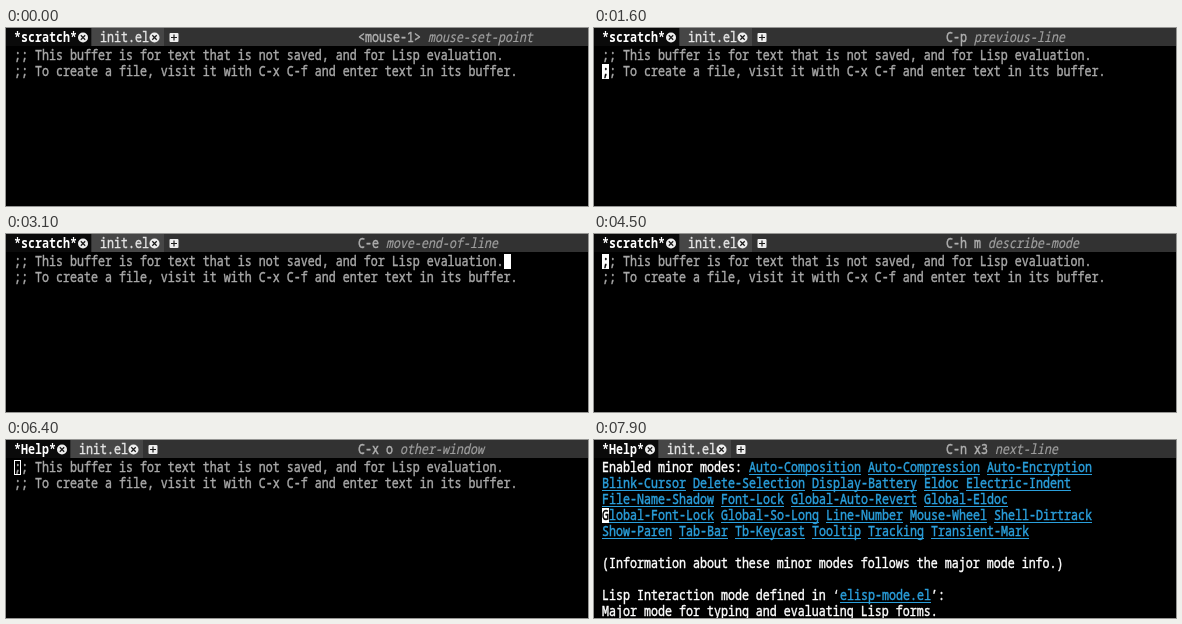
These frames come from a looping animation (582 by 178 pixels, 8 s). An HTML page:

```html
<!DOCTYPE html>
<html lang="en">
<head>
<meta charset="utf-8">
<title>Keycast in the tab bar</title>
<style>
  html, body { margin: 0; width: 100%; height: 100%; overflow: hidden; background: #000; }
  svg { display: block; width: 582px; height: 178px; }
  text { font: 500 14px "Noto Sans Mono", "DejaVu Sans Mono", monospace; white-space: pre; stroke-width: .45px; }
  .bold { font-weight: 700; stroke-width: 0; }
  .italic { font-style: italic; font-weight: 400; stroke-width: .2px; }
</style>
</head>
<body>
<svg id="stage" viewBox="0 0 582 178"></svg>
<script>
const LOOP = 8000, LEFT = 8, CHAR = 7, LINE = 16, TOP = 20;
const NARROW = 5 / 6; // condensed face: 8.4px advance becomes 7px
const C = {
  bar: '#323232', tab: '#464646', active: '#0a0a0a', bright: '#ffffff', inactive: '#e4e4e4', icon: '#eeeeee',
  mark: '#1c1c1c', key: '#b0b0b0', command: '#a0a0a0', comment: '#a8a8a8', help: '#ffffff',
  link: '#2a9fdc', cursor: '#ffffff'
};

const scratch = [
  ';; This buffer is for text that is not saved, and for Lisp evaluation.',
  ';; To create a file, visit it with C-x C-f and enter text in its buffer.'
];
// Square brackets mark links.
const help = [
  'Enabled minor modes: [Auto-Composition] [Auto-Compression] [Auto-Encryption]',
  '[Blink-Cursor] [Delete-Selection] [Display-Battery] [Eldoc] [Electric-Indent]',
  '[File-Name-Shadow] [Font-Lock] [Global-Auto-Revert] [Global-Eldoc]',
  '[Global-Font-Lock] [Global-So-Long] [Line-Number] [Mouse-Wheel] [Shell-Dirtrack]',
  '[Show-Paren] [Tab-Bar] [Tb-Keycast] [Tooltip] [Tracking] [Transient-Mark]',
  '',
  '(Information about these minor modes follows the major mode info.)',
  '',
  'Lisp Interaction mode defined in ‘[elisp-mode.el]’:',
  'Major mode for typing and evaluating Lisp forms.'
];

// Each key press: time, key, command, cursor row and column, and window state.
const press = (at, key, command, row, col = 0, view = {}) => ({ at, key, command, row, col, ...view });
const other = { tab: '*Help*', hollow: true };
const full = { tab: '*Help*', full: true };
const events = [
  press(-500, '<mouse-1>', 'mouse-set-point', 3),
  press(700, 'C-p', 'previous-line', 2),
  press(1300, 'C-p', 'previous-line', 1),
  press(2200, 'C-p x2', 'previous-line', 0),
  press(2800, 'C-e', 'move-end-of-line', 0, scratch[0].length),
  press(3500, 'C-a', 'move-beginning-of-line', 0),
  press(4500, 'C-h m', 'describe-mode', 0),
  press(6300, 'C-x o', 'other-window', 0, 0, other),
  press(6600, 'C-x 1', 'delete-other-windows', 0, 0, full),
  press(7300, 'C-n', 'next-line', 1, 0, full),
  press(7550, 'C-n x2', 'next-line', 2, 0, full),
  press(7800, 'C-n x3', 'next-line', 3, 0, full)
];

const rect = (x, y, w, h, fill, extra = '') =>
  `<rect x="${x}" y="${y}" width="${w}" height="${h}" fill="${fill}" ${extra}/>`;
const path = (d, stroke, width) => `<path d="${d}" fill="none" stroke="${stroke}" stroke-width="${width}"/>`;
const escape = s => s.replace(/&/g, '&amp;').replace(/</g, '&lt;');
const text = (x, y, s, fill, cls = '') =>
  `<text transform="translate(${x} ${y}) scale(${NARROW} 1)" fill="${fill}" stroke="${fill}" class="${cls}">${escape(s)}</text>`;
const baseline = row => TOP + row * LINE + 12;

function closeIcon(x) {
  return `<circle cx="${x}" cy="9.5" r="5" fill="${C.icon}"/>` +
    path(`M${x - 2.2} 7.3l4.4 4.4m0-4.4l-4.4 4.4`, C.mark, 1.3);
}

function tabBar({ tab = '*scratch*', key, command }) {
  const end = LEFT + tab.length * CHAR, next = end + 15;
  const nameEnd = next + 8 + 7 * CHAR, plus = nameEnd + 25;
  return rect(0, 0, 582, 18, C.bar) +
    rect(0, 0, next - 1, 18, C.active) +
    rect(next, 0, 72, 18, C.tab) +
    text(LEFT, 14, tab, C.bright, 'bold') + closeIcon(end + 6) +
    text(next + 8, 14, 'init.el', C.inactive) + closeIcon(nameEnd + 5.5) +
    rect(plus - 4.5, 5, 9, 9, C.icon, 'rx="1"') +
    path(`M${plus - 3} 9.5h6m-3-3v6`, C.mark, 1.2) +
    text(352, 14, key, C.key) +
    text(352 + (key.length + 1) * CHAR, 14, command, C.command, 'italic');
}

function helpLine(line, row) {
  let x = LEFT;
  return line.split(/[\[\]]/).map((part, i) => {
    const link = i % 2, width = part.length * CHAR;
    const out = text(x, baseline(row), part, link ? C.link : C.help) +
      (link ? rect(x, baseline(row) + 2, width, 1, C.link) : '');
    x += width;
    return out;
  }).join('');
}

function cursor({ row, col, hollow, full }) {
  const x = LEFT + col * CHAR, y = TOP + row * LINE;
  if (hollow) return rect(x + .5, y + .5, CHAR - 1, LINE - 2, 'none', `stroke="${C.cursor}"`);
  const line = (full ? help : scratch)[row] || '';
  return rect(x, y, CHAR, LINE - 1, C.cursor) +
    text(x, baseline(row), line.replace(/[\[\]]/g, '')[col] || '', '#000');
}

const stage = document.getElementById('stage');
let shown = '';

function draw(t) {
  const index = events.findLastIndex(e => e.at <= t), state = events[index];
  // The cursor blinks every half second after a key press.
  const visible = state.hollow || Math.floor((t - state.at) / 500) % 2 === 0;
  const id = `${index} ${visible}`;
  if (id === shown) return;
  shown = id;
  const body = state.full
    ? help.map(helpLine).join('')
    : scratch.map((line, row) => text(LEFT, baseline(row), line, C.comment)).join('');
  stage.innerHTML = rect(0, 0, 582, 178, '#000') + tabBar(state) + body + (visible ? cursor(state) : '');
}

const start = performance.now();
function tick() {
  draw((performance.now() - start) % LOOP);
  requestAnimationFrame(tick);
}
tick();
</script>
</body>
</html>
```
